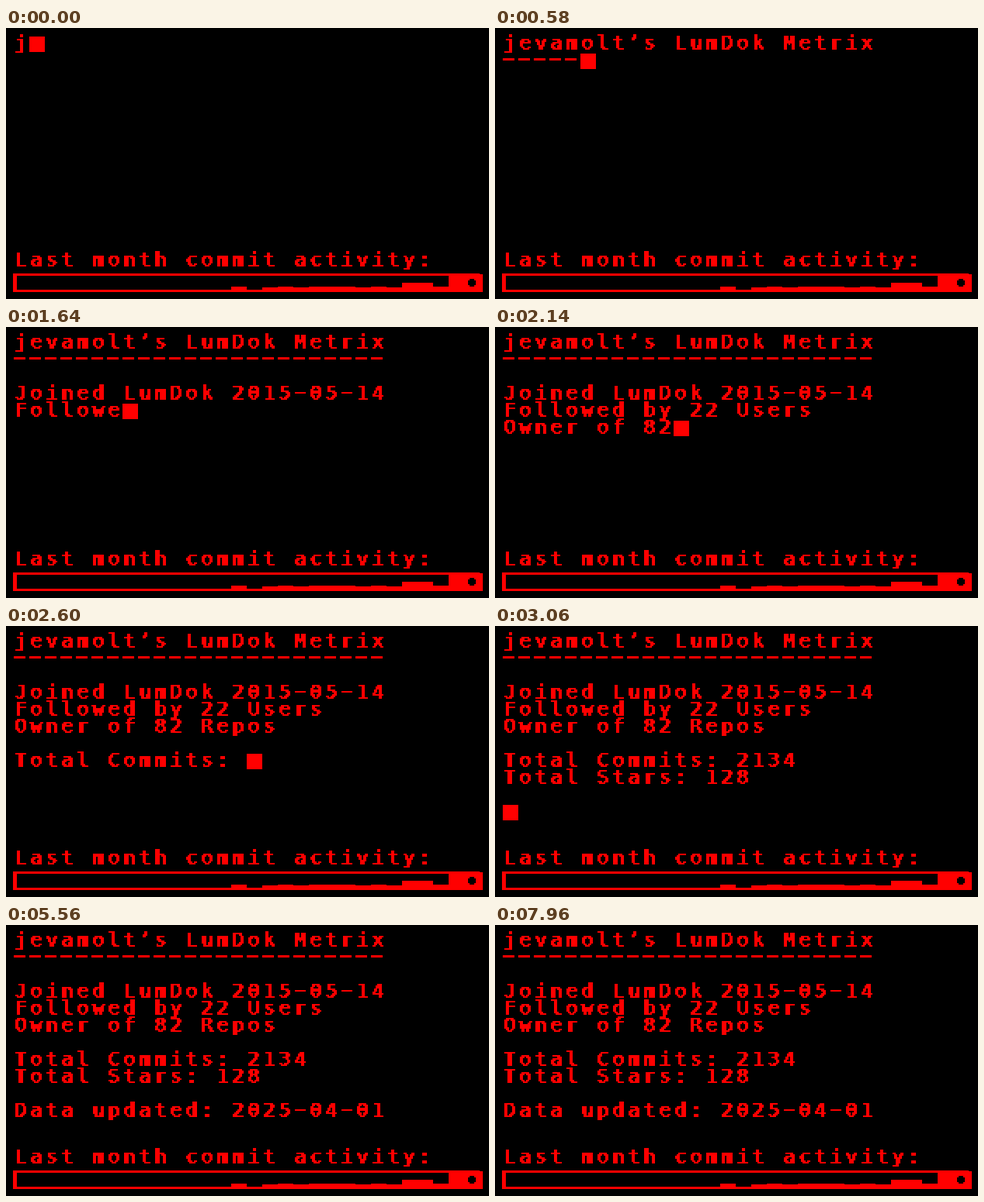
An HTML page for the animation above (8.36 s loop, 622x350 px).

```html
<!DOCTYPE html>
<html lang="en">
<head>
<meta charset="utf-8">
<title>Commit terminal</title>
<style>
  html, body { margin: 0; width: 100%; height: 100%; overflow: hidden; background: #000; }
  #stage { position: relative; width: 622px; height: 350px; overflow: hidden; background: #000; }
  #stage > * { position: absolute; }
  #text { inset: 0; filter: url(#pixel); }
  /* side shadows make the upright strokes heavier than the level ones */
  pre {
    position: absolute; left: 11px; margin: 0; color: #f00;
    font: 25px/22px "DejaVu Sans Mono", monospace;
    letter-spacing: calc(20px - 1ch);
    text-shadow: 1px 0 #f00, -1px 0 #f00;
    font-variant-ligatures: none;
  }
  #typed { top: 8px; }
  #label { top: 288px; }
  #rule {
    left: 10px; top: 39px; height: 3px;
    background: repeating-linear-gradient(90deg, #f00 0 15px, transparent 15px 20px);
  }
  #cursor { left: 10px; top: 11px; width: 20px; height: 20px; background: #f00; }
  svg { left: 0; top: 0; }
</style>
</head>
<body>
<div id="stage">
  <div id="text">
    <pre id="typed"></pre>
    <pre id="label">Last month commit activity:</pre>
  </div>
  <div id="rule"></div>
  <div id="cursor"></div>
  <svg width="622" height="350" fill="#f00" shape-rendering="crispEdges">
    <defs>
      <!-- hard edges on a 2px grid -->
      <filter id="pixel" filterUnits="userSpaceOnUse" x="0" y="0" width="622" height="350"
              color-interpolation-filters="sRGB">
        <feFlood x="0" y="0" width="1" height="1" flood-color="#fff" result="dot"/>
        <feOffset in="dot" x="0" y="0" width="2" height="2"/>
        <feTile result="grid"/>
        <feComposite in="SourceGraphic" in2="grid" operator="in"/>
        <feComponentTransfer result="a"><feFuncA type="discrete" tableValues="0 1"/></feComponentTransfer>
        <feOffset in="a" dx="1" result="b"/>
        <feMerge result="c"><feMergeNode in="a"/><feMergeNode in="b"/></feMerge>
        <feOffset in="c" dy="1" result="d"/>
        <feMerge><feMergeNode in="c"/><feMergeNode in="d"/></feMerge>
      </filter>
    </defs>
    <path d="M9 317H610V320H9zM9 317H14V341H9zM9 338H614V341H9zM610 318H614V341H610z"/>
    <path id="bars"/>
    <path fill="#000" d="M597 324h6v2h2v6h-2v2h-6v-2h-2v-6h2z"/>
  </svg>
</div>
<script>
  const LOOP = 8360, STEP = 20, CELL = 20, ROW = 22, BLINK = 400, BLINK_START = 3960;
  const RULE_ROW = 1;
  const script = [
    "jevamolt’s LumDok Metrix",
    "-".repeat(24),
    "",
    "Joined LumDok 2015−05−14",
    "Followed by 22 Users",
    "Owner of 82 Repos",
    "",
    "Total Commits: 2134",
    "Total Stars: 128",
    "",
    "Data updated: 2025−04−01"
  ].join("\n");

  const $ = id => document.getElementById(id);
  const typed = $("typed"), rule = $("rule"), cursor = $("cursor");

  // daily bar heights, ending at the right edge
  const days = [5, 0, 4, 5, 4, 5, 5, 5, 4, 5, 4, 10, 10, 5, 20, 20];
  $("bars").setAttribute("d", days.map((h, i) =>
    `M${290 + i * CELL} ${339 - h}h${CELL}V341h-${CELL}z`).join(""));

  let shown = -1;
  function type(count) {
    if (count === shown) return;
    shown = count;
    const rows = script.slice(0, count).split("\n");
    const last = rows.length - 1;
    cursor.style.transform = `translate(${rows[last].length * CELL}px, ${last * ROW}px)`;
    rule.style.width = (rows[RULE_ROW] || "").length * CELL + "px";
    if (last >= RULE_ROW) rows[RULE_ROW] = "";
    typed.textContent = rows.join("\n");
  }

  const start = performance.now();
  function draw(now) {
    const t = Math.max(0, now - start) % LOOP;
    type(Math.min(script.length, Math.floor(t / STEP) + 1));
    const off = t >= BLINK_START && Math.floor((t - BLINK_START) / BLINK) % 2 === 0;
    cursor.style.visibility = off ? "hidden" : "visible";
    requestAnimationFrame(draw);
  }
  draw(start);
</script>
</body>
</html>
```
